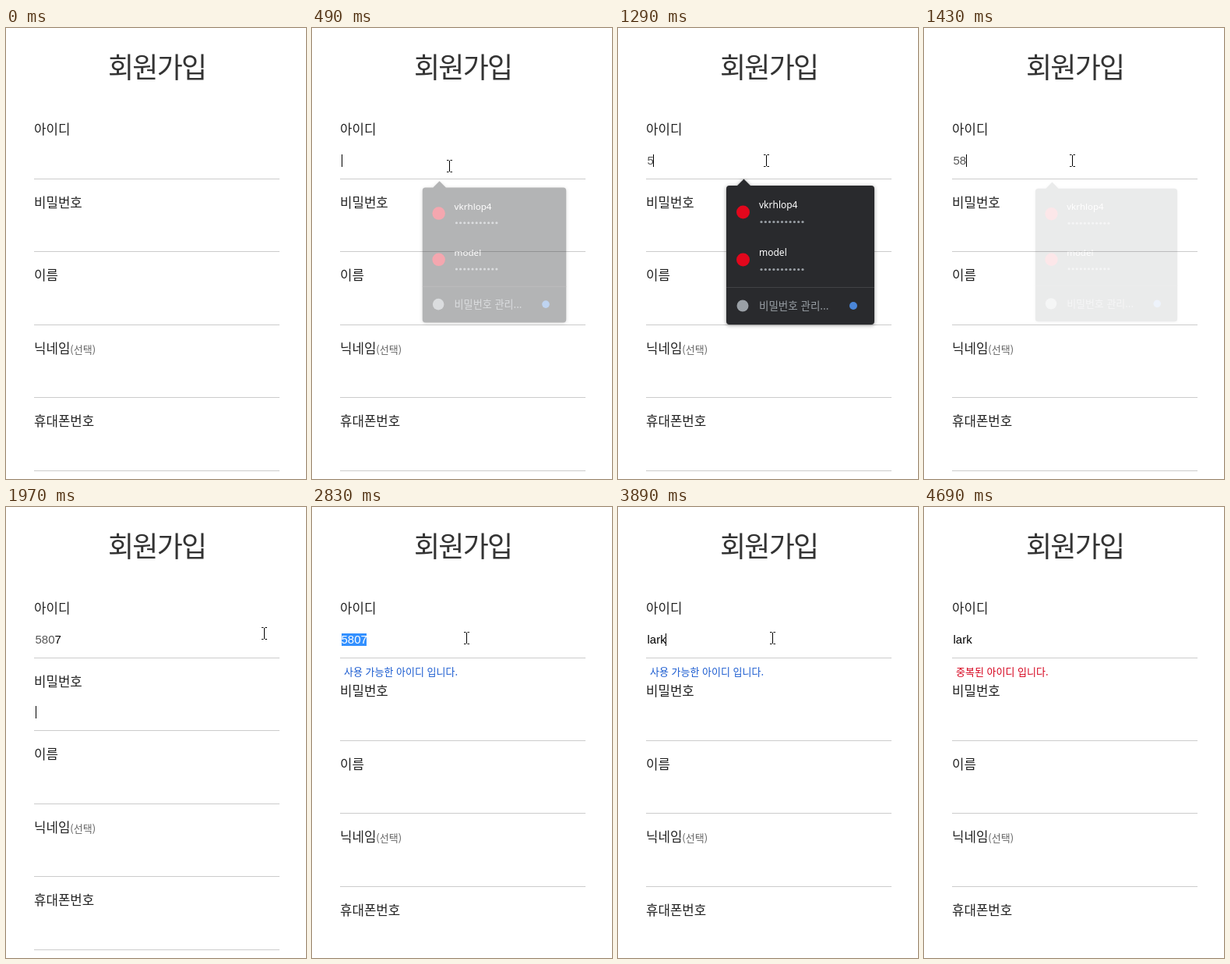
Animation, 385 px wide and 578 px high, one loop 5.22 s. Source, as an HTML page:

```html
<!DOCTYPE html>
<html lang="ko">
<head>
<meta charset="utf-8">
<title>회원가입</title>
<style>
  html, body { margin: 0; width: 100%; height: 100%; overflow: hidden; background: #fff; }
  svg { display: block; width: 385px; height: 578px; }
  text { font-family: "Noto Sans CJK KR", "Noto Sans CJK", sans-serif; white-space: pre; }
  .title { font-size: 36px; letter-spacing: -0.05em; fill: #333; }
  .label { font-size: 16.8px; fill: #222; }
  .label .hint { font-size: 13px; fill: #666; }
  .note { font-size: 13px; }
  .value { font-family: "Liberation Sans", Arial, sans-serif; font-size: 15px; }
  .menu { font-family: "Noto Sans", sans-serif; font-size: 12px; fill: #fff; }
  .manage { font-size: 13.5px; fill: #9aa0a6; }
  .panel { fill: #292a2d; filter: drop-shadow(0 1px 2.5px rgba(0, 0, 0, .4)); }
  .pop { transform-box: view-box; }
</style>
</head>
<body>
<svg viewBox="0 0 385 578">
  <text class="title" x="131" y="64">회원가입</text>
  <g id="fields"></g>
  <text id="note" class="note" x="41" y="216"></text>

  <rect id="mark" x="38" y="162" width="32" height="16" fill="#3390ff"/>
  <text id="value" class="value" x="37.5" y="175"><tspan id="soft" fill="#555"></tspan><tspan id="dark" fill="#000"></tspan></text>
  <rect id="caret" width="1" height="16" fill="#000"/>

  <g id="logins" class="pop">
    <path class="panel" d="M143 202H153L161.5 193.5L170 202H325a4 4 0 0 1 4 4V376a4 4 0 0 1 -4 4H143a4 4 0 0 1 -4 -4V206a4 4 0 0 1 4 -4Z"/>
    <g id="accounts"></g>
    <rect x="139" y="332" width="190" height="1" fill="#414246"/>
    <circle cx="160" cy="356" r="7.5" fill="#9aa0a6"/>
    <text class="manage" x="181" y="361">비밀번호 관리...</text>
    <circle cx="302" cy="356" r="5" fill="#4a86d8"/>
  </g>

  <g id="hints" class="pop">
    <path id="hintPanel" class="panel"/>
    <text class="menu" x="152" y="230">lark</text>
    <text id="second" class="menu" x="152" y="262">lark1</text>
  </g>

  <path id="cursor" d="M-3.5 -7.5H-1M1 -7.5H3.5M-3.5 7.5H-1M1 7.5H3.5M0 -7V7" fill="none" stroke="#000"/>
</svg>
<script>
const LOOP = 5220;
const $ = id => document.getElementById(id);
const set = (el, attrs) => { for (const k in attrs) el.setAttribute(k, attrs[k]); };
const show = (el, on) => { el.style.display = on ? '' : 'none'; };

function add(parent, tag, attrs, text = '') {
  const el = document.createElementNS('http://www.w3.org/2000/svg', tag);
  set(el, attrs);
  el.textContent = text;
  return parent.appendChild(el);
}

// Each track holds its values until the next listed time.
const tracks = {
  cursor: [[0], [70, 381, 500], [140, 352, 420], [210, 300, 320], [280, 245, 240],
    [350, 205, 195], [420, 184, 180], [490, 176, 177], [560, 172, 176], [630, 183, 173],
    [830, 190, 170], [1900, 331, 162], [2040, 278, 163], [2300, 250, 163], [2370, 220, 163],
    [2440, 200, 163], [2750, 190, 163], [2830, 198, 168], [4160, 231, 168], [4230]],
  typed: [[0, '', ''], [1290, '5', ''], [1430, '58', ''], [1500, '580', ''], [1700, '580', '7'],
    [3230, '', 'l'], [3360, '', 'la'], [3630, '', 'lark']],
  caret: [[0], [490, 'id'], [1090], [1290, 'id'], [1970, 'pw'], [2510, 'id'], [2680],
    [3230, 'id'], [4160, 'pw'], [4690]],
  marked: [[0, false], [2680, true], [3230, false]],
  note: [[0, '', '#000'], [2040, '사용 가능한 아이디 입니다.', '#1a5bd0'], [4230, '중복된 아이디 입니다.', '#d6001c']],
  logins: [[0, 0], [490, .35], [560, 1], [1360, .6], [1430, .09], [1500, 0]],
  hints: [[0, 0], [3230, .5], [3360, 1], [3700, .9], [3760, .5], [3830, .1], [3890, 0]]
};

function at(name, t) {
  let found = tracks[name][0];
  for (const step of tracks[name]) if (step[0] <= t) found = step;
  return found.slice(1);
}

const fields = ['아이디', '비밀번호', '이름', '닉네임', '휴대폰번호'].map((name, i) => {
  const label = add($('fields'), 'text', { class: 'label', x: 36 }, name);
  if (i === 3) add(label, 'tspan', { class: 'hint' }, '(선택)');
  const line = add($('fields'), 'rect', { x: 36, width: 315, height: 1, fill: '#ccc' });
  return { label, line };
});

['vkrhlop4', 'model'].forEach((name, i) => {
  const y = 61 * i, box = $('accounts');
  add(box, 'circle', { cx: 160.5, cy: 236 + y, r: 8.5, fill: '#e2071c' });
  add(box, 'text', { class: 'menu', x: 181, y: 231 + y }, name);
  for (let d = 0; d < 11; d++)
    add(box, 'circle', { cx: 184 + 5.3 * d, cy: 248.5 + y, r: 1.6, fill: '#9aa0a6' });
});

function layout(moved) {
  fields.forEach(({ label, line }, i) => {
    const dy = 93.5 * i + (moved && i ? 12.45 : 0);
    set(label, { y: Math.floor(136.6 + dy) });
    set(line, { y: Math.floor(193.4 + dy) });
  });
}

function popup(el, alpha, cx, cy) {
  const s = .955 + .045 * alpha;
  show(el, alpha > 0);
  set(el, { opacity: alpha, transform: `translate(${cx} ${cy}) scale(${s}) translate(${-cx} ${-cy})` });
}

function draw(t) {
  const [note, color] = at('note', t);
  layout(note);
  $('note').textContent = note;
  set($('note'), { fill: color });

  const [soft, dark] = at('typed', t);
  const [marked] = at('marked', t);
  $('soft').textContent = soft;
  $('dark').textContent = dark;
  set($('soft'), { fill: marked ? '#fff' : '#555' });
  set($('dark'), { fill: marked ? '#fff' : '#000' });
  show($('mark'), marked);

  const [where] = at('caret', t);
  show($('caret'), where);
  if (where === 'id') {
    const w = soft + dark ? $('value').getComputedTextLength() : .5;
    set($('caret'), { x: Math.floor(37.5 + w), y: 162 });
  } else if (where) {
    set($('caret'), { x: 38, y: note ? 268 : 255 });
  }

  popup($('logins'), at('logins', t)[0], 234, 291);

  const two = t < 3630, w = two ? 68 : 64, h = two ? 80 : 48;
  set($('hintPanel'), {
    d: `M143 202H153L161.5 193.5L170 202h${w - 35}a4 4 0 0 1 4 4v${h - 8}a4 4 0 0 1 -4 4H143a4 4 0 0 1 -4 -4V206a4 4 0 0 1 4 -4Z`
  });
  show($('second'), two);
  popup($('hints'), at('hints', t)[0], 139 + w / 2, 202 + h / 2);

  const [x, y] = at('cursor', t);
  show($('cursor'), x);
  if (x) set($('cursor'), { transform: `translate(${x + .5} ${y})` });
}

const start = performance.now();
function tick(now) {
  draw(Math.max(0, now - start) % LOOP);
  requestAnimationFrame(tick);
}
draw(0);
requestAnimationFrame(tick);
</script>
</body>
</html>
```
